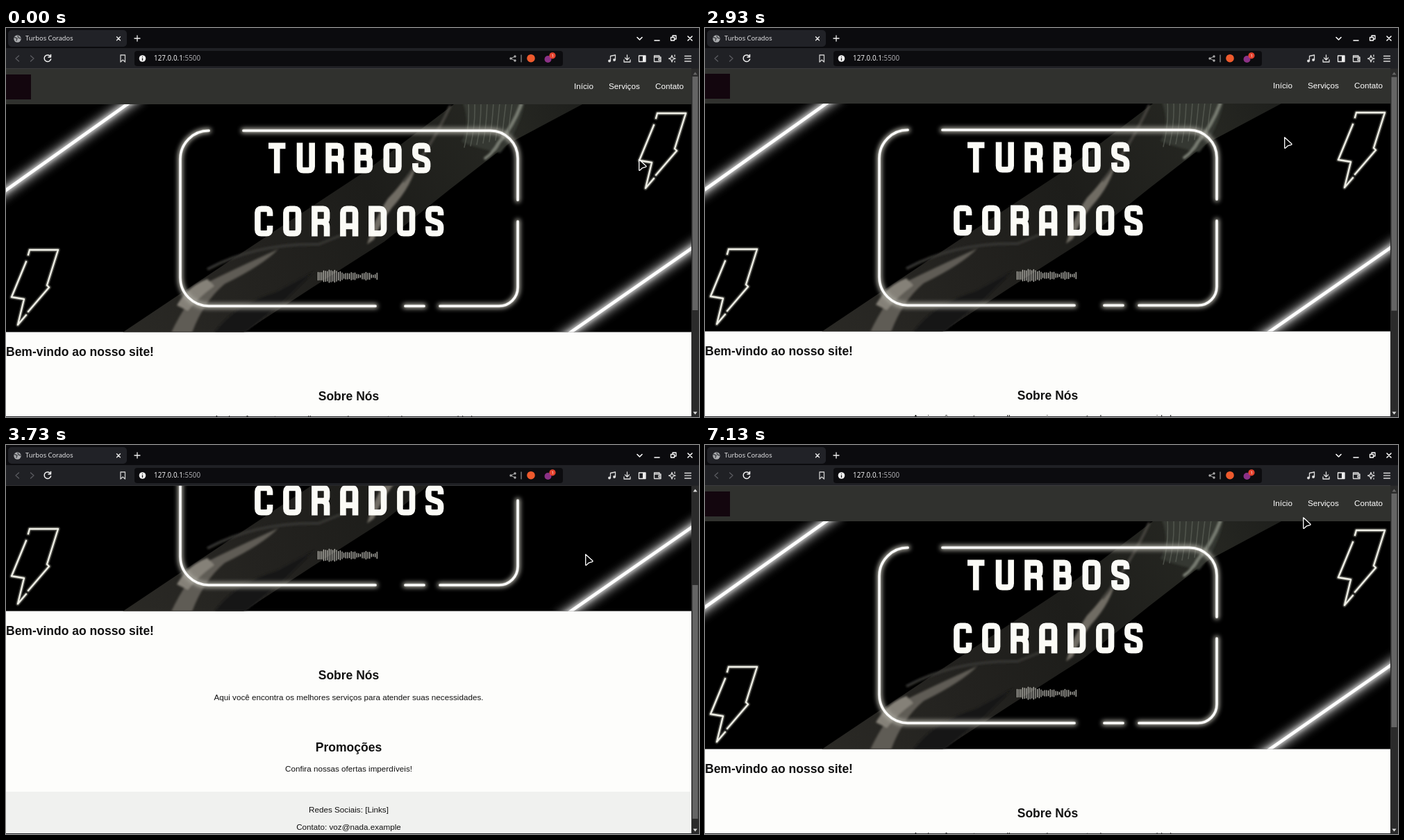
Recreate the animation shown at these times as an HTML page. Size 998 by 561 pixels, loop 7790 ms.

```html
<!DOCTYPE html>
<html lang="pt-BR">
<head>
<meta charset="utf-8">
<title>Turbos Corados</title>
<style>
html, body { margin: 0; width: 100%; height: 100%; overflow: hidden; background: #0b0b0e; }
svg { display: block; width: 100vw; height: 100vh; }
.ui { font-family: "Noto Sans", "Open Sans", sans-serif; }
.page { font: 11.68px "Liberation Sans", Arial, sans-serif; fill: #111; }
.page .title { font-size: 17.5px; font-weight: bold; }
.line { fill: none; stroke-linecap: round; stroke-linejoin: round; }
</style>
</head>
<body>
<svg viewBox="0 0 998 561" xmlns="http://www.w3.org/2000/svg">
  <defs>
    <clipPath id="view"><rect y="58.5" width="987" height="501.5"/></clipPath>
    <clipPath id="bannerClip"><rect y="110" width="987" height="328.6"/></clipPath>
    <filter id="glow" filterUnits="userSpaceOnUse" x="-40" y="70" width="1070" height="410"><feGaussianBlur stdDeviation="3.2"/></filter>
    <filter id="wide" filterUnits="userSpaceOnUse" x="-60" y="60" width="1110" height="430"><feGaussianBlur stdDeviation="6.5"/></filter>
    <filter id="soft" filterUnits="userSpaceOnUse" x="100" y="70" width="800" height="420"><feGaussianBlur stdDeviation="1.6"/></filter>
    <linearGradient id="film" gradientUnits="userSpaceOnUse" x1="170" y1="439" x2="830" y2="110">
      <stop offset="0" stop-color="#2a2925"/><stop offset=".3" stop-color="#23221f"/>
      <stop offset=".55" stop-color="#1d1d1a"/><stop offset=".85" stop-color="#262722"/><stop offset="1" stop-color="#1e1f1c"/>
    </linearGradient>
    <path id="bolt" d="M37 1H75L59 52 62 55 32 90M29 95 17 109 26 72 8 69 29 18M32 8 34 1H40"/>
  </defs>

  <g clip-path="url(#view)"><g id="page" class="page">
    <rect y="58" width="987" height="720" fill="#fdfdfb"/>
    <rect y="58" width="987" height="52" fill="#30312e"/>
    <rect y="67" width="36" height="36" fill="#13060e"/>
    <g fill="#fff"><text x="818" y="88">Início</text><text x="868" y="88">Serviços</text><text x="935" y="88">Contato</text></g>
    <g id="banner" clip-path="url(#bannerClip)"></g>
    <text class="title" x="0" y="472.5">Bem-vindo ao nosso site!</text>
    <rect y="699" width="987" height="80" fill="#f0f1ef"/>
    <g text-anchor="middle">
      <text class="title" x="493.5" y="537">Sobre Nós</text>
      <text x="493.5" y="566.5">Aqui você encontra os melhores serviços para atender suas necessidades.</text>
      <text class="title" x="493.5" y="641">Promoções</text>
      <text x="493.5" y="670">Confira nossas ofertas imperdíveis!</text>
      <text x="493.5" y="728.5">Redes Sociais: [Links]</text>
      <text x="493.5" y="753.5">Contato: voz@nada.example</text>
    </g>
  </g></g>

  <rect x="987" y="58" width="11" height="503" fill="#2b2b2b"/>
  <rect id="thumb" x="988.5" y="70" width="8" height="337" fill="#656565"/>
  <path id="upArrow" d="M989.5 67.5 992.5 63.5 995.5 67.5Z" fill="#ddd"/>
  <path d="M989.5 553.5 992.5 557.5 995.5 553.5Z" fill="#ddd"/>
  <rect y="560" width="998" height="1" fill="#25262a"/>

  <g id="chrome" class="ui"></g>
  <g id="taskbar" class="ui"></g>
  <path id="cursor" class="line" d="M.7.8V15.6Q.8 17 2 16L5.5 12.8 10.4 11.4Q11.6 10.8 10.6 9.8Z" style="fill:#050505" stroke="#fff" stroke-width="1.3"/>
</svg>

<script>
const $ = id => document.getElementById(id);
const stroke = (d, color = '#ddd', width = 1.3, extra = '') =>
  `<path class="line" d="${d}" stroke="${color}" stroke-width="${width}" ${extra}/>`;
const disc = (x, y, r, fill) => `<circle cx="${x}" cy="${y}" r="${r}" fill="${fill}"/>`;
const box = (x, y, w, h, fill, r = 0) => `<rect x="${x}" y="${y}" width="${w}" height="${h}" rx="${r}" fill="${fill}"/>`;
const label = (x, y, size, text, fill = '#eee', weight = 400) =>
  `<text x="${x}" y="${y}" font-size="${size}" font-weight="${weight}" fill="${fill}">${text}</text>`;

// Display lettering on a 27 x 45 grid
const glyphs = {
  T: 'M1 4.5H26M13.5 4.5V45',
  U: 'M4.5 0V35Q4.5 40.5 10 40.5H17Q22.5 40.5 22.5 35V0',
  R: 'M4.5 45V4.5H17Q22.5 4.5 22.5 10V18Q22.5 23.5 17 23.5H5M15 23.5Q22.5 24 22.5 31V45',
  B: 'M4.5 22H16Q21.5 22 21.5 17V10Q21.5 4.5 16 4.5H4.5V40.5H17Q22.5 40.5 22.5 35V28Q22.5 22 16 22',
  O: 'M4.5 10Q4.5 4.5 10 4.5H17Q22.5 4.5 22.5 10V35Q22.5 40.5 17 40.5H10Q4.5 40.5 4.5 35Z',
  S: 'M22.5 14V10Q22.5 4.5 17 4.5H10Q4.5 4.5 4.5 10V15Q4.5 19 8 21L19 25Q22.5 27 22.5 31V35Q22.5 40.5 17 40.5H10Q4.5 40.5 4.5 35V30',
  C: 'M22.5 15V10Q22.5 4.5 17 4.5H10Q4.5 4.5 4.5 10V35Q4.5 40.5 10 40.5H17Q22.5 40.5 22.5 35V29',
  A: 'M4.5 45V10Q4.5 4.5 10 4.5H17Q22.5 4.5 22.5 10V45M4.5 30H22.5',
  D: 'M4.5 4.5H16Q22.5 4.5 22.5 11V34Q22.5 40.5 16 40.5H4.5Z'
};
const lettering = (word, x, y, pitch) => `<g aria-label="${word}">` + [...word].map((c, i) =>
  `<path transform="translate(${x + i * pitch} ${y}) scale(.98)" d="${glyphs[c]}" fill="none" stroke="#fbfbf6" stroke-width="8.8"/>`).join('') + '</g>';

function drawBanner() {
  const frame = 'M292 148A41 41 0 0 0 251 189V360A41 41 0 0 0 292 401H532M575 401H602M625 401H710A27 27 0 0 0 737 374V279M737 248V188A40 40 0 0 0 697 148H342';
  const beams = 'M-10 241 190 99M800 448 1000 309';
  const bolts = [[0, 319], [904, 122]].map(([x, y]) => {
    const use = (color, width, opacity) =>
      `<use href="#bolt" class="line" stroke="${color}" stroke-width="${width}" opacity="${opacity}"/>`;
    return `<g transform="translate(${x} ${y})">${use('#8a8a80', 7, .22)}${use('#a5a59b', 4.4, .45)}${use('#efefe6', 2.3, 1)}</g>`;
  }).join('');

  let wave = '';
  for (let i = 0; i < 33; i++) {
    const h = i < 17 ? 4 + 5 * Math.abs(Math.sin(i * .19 + .3)) - (i % 3) * .9
                     : 1.5 + 4 * Math.abs(Math.sin(i * .42)) - (i % 2);
    const x = 449.5 + i * 2.65;
    wave += `M${x} ${358 - h}V${358 + h}`;
  }

  let folds = '';
  for (let i = 0; i < 8; i++)
    folds += `M${666 + i * 9} 108Q${668 + i * 8} 140 ${660 + i * 9} ${172 - i * 2}`;

  $('banner').innerHTML =
    box(0, 110, 987, 329, '#000') +
    '<path d="M168 439 250 384 400 284 520 205 645 110H830L725 166 640 232 545 308 440 375 342 439Z" fill="url(#film)"/>' +
    '<g filter="url(#soft)">' +
    '<path d="M238 439Q262 388 292 366 330 347 392 319 370 342 315 369 285 394 268 439Z" fill="#5f5c54"/>' +
    '<path d="M246 400Q262 372 290 362L300 372Q275 390 262 408Z" fill="#858178"/>' +
    '<path d="M300 439Q330 398 390 380L445 350 400 394 345 439Z" fill="#161614"/>' +
    '<path d="M520 312Q530 275 550 246 570 226 592 192 586 226 556 259 538 283 530 305Z" fill="#706c63"/>' +
    '<path d="M290 348Q360 310 450 312L490 296" fill="none" stroke="#363430" stroke-width="4"/>' +
    '<path d="M572 222Q608 180 640 112" fill="none" stroke="#45433e" stroke-width="4"/>' +
    '<path d="M658 108H747Q738 150 712 180 680 174 656 164 670 140 658 108Z" fill="#363932"/>' +
    stroke('M742 110Q730 142 710 165 702 180 690 188', '#7c8076', 4) + '</g>' +
    stroke(folds, '#62665c', 1.5, 'opacity=".65"') +
    stroke(beams, '#858585', 17, 'filter="url(#wide)"') +
    stroke(beams, '#ddd', 6, 'filter="url(#glow)"') +
    stroke(beams, '#fff', 4.6) +
    stroke(frame, '#aaa9a0', 7.5, 'filter="url(#glow)"') +
    stroke(frame, '#e4e4da', 4.4, 'opacity=".5"') +
    stroke(frame, '#fff', 3.2) +
    bolts +
    lettering('TURBOS', 377, 165.5, 41.6) +
    lettering('CORADOS', 358, 256.5, 41) +
    stroke(wave, '#bdbcb5', 1.3);
}

function drawChrome() {
  const dim = '#5b5c61';
  $('chrome').innerHTML =
    box(0, 0, 998, 30, '#0b0b0e') + box(0, 29, 998, 29.5, '#202125') +
    box(3, 3, 171, 24, '#212227', 5) +
    disc(16.5, 15.5, 5.2, '#a9abae') + stroke('M12.5 13.5 16 15 15 18M17 11.5 18 14 21 15', '#44464a', 1.4) +
    label(28, 18.3, 9.3, 'Turbos Corados', '#e2e2e4') +
    stroke('M159.5 12.8 164.5 17.8M164.5 12.8 159.5 17.8M189 11V19M185 15H193', '#eee') +
    stroke('M909 13.5 912.5 17 916 13.5M934 18H941M982 12 988 18M988 12 982 18', '#fff', 1.6) +
    stroke('M957.5 13.5H962.5V18H957.5ZM960 13V11H965V16H963', '#fff') +
    stroke('M18.5 40 14 44 18.5 48M35.5 40 40 44 35.5 48', dim) +
    stroke('M63.8 40.8A4.8 4.8 0 1 0 64.6 45M64.5 38.5V42H61', '#f4f4f4', 1.5) +
    box(185, 33, 617, 22, '#0c0c0f', 4) +
    stroke('M165 39H171.5V49L168.2 46 165 49Z', '#ccc') +
    disc(196.5, 44, 4.8, '#eee') + stroke('M196.5 43.8V46.3M196.5 41.5V41.6', '#111', 1.2) +
    `<text x="213" y="47.3" font-size="9.9" fill="#ececee">127.0.0.1<tspan fill="#a9a9ad">:5500</tspan></text>` +
    stroke('M733 41 727 44 733 47', '#aaa', 1) + disc(733, 41, 1.7, '#aaa') + disc(727, 44, 1.7, '#aaa') + disc(733, 47, 1.7, '#aaa') +
    stroke('M742 39V49', '#aaa', 1) +
    disc(756, 43.7, 5.8, '#ee5a2d') + disc(780.5, 45, 5, '#8b3186') +
    disc(787, 39.8, 4.6, '#e5432f') + label(785.5, 42.2, 6, '1', '#fff') +
    stroke('M870.5 47.5V40.5L877.5 39V46', '#ddd') + disc(869, 47.5, 1.9, '#ddd') + disc(876, 46, 1.9, '#ddd') +
    stroke('M894.5 39V46M891.5 43 894.5 46 897.5 43M890 46V49H899V46') +
    stroke('M911.5 40H921V48.5H911.5Z', '#eee') + box(917, 40, 4, 9, '#eee') +
    stroke('M933.5 40H941V42H943V48.5H933.5ZM933.5 42H941M943 44H940V46.5H943') +
    stroke('M959 39.5 960.3 43 964 44.2 960.3 45.5 959 49 957.7 45.5 954.5 44.2 957.7 43ZM963 39V41M963 48V49') +
    stroke('M977.5 40.5H986.5M977.5 44.2H986.5M977.5 48H986.5');
}

function drawTaskbar() {
  const purple = '#8462c6', light = '#eee';
  $('taskbar').innerHTML =
    box(0, 531, 998, 30, '#25262c') + box(37, 531, 1, 30, '#34353b') +
    disc(15, 546, 11, '#e6e6e6') +
    box(397, 531, 27, 30, '#46474d') + disc(411.5, 546, 9.5, '#ef5b31') +
    disc(403.5, 539, 6, '#3d3e43') + label(401, 542, 8.5, '2', '#fff') +
    box(430, 536, 20, 20, '#35a0a6', 3) + box(459, 536, 20, 20, '#2368bd', 3) +
    box(488, 538, 10, 8, '#6748a8', 2) + box(488, 540, 21, 15, '#8060bd', 2) +
    box(516, 535, 21, 21, '#141519', 3) + label(519, 543, 7, '$_', '#eee') +
    box(547, 536, 20, 20, '#62b3d0', 3) + stroke('M550 547H553L555 540 558 552 561 544 563 547', '#fff') +
    disc(586, 546, 10, '#4b4945') +
    [397, 455, 485, 514].map(x => box(x, 559, 27, 2, purple)).join('') +
    disc(689.5, 544.5, 3.8, '#df4e7c') + stroke('M689.5 548V552', '#df4e7c') +
    label(699, 550, 9.6, '2160k - 100% - 1.00', light, 700) +
    stroke('M799.5 543.5 804.5 549 802 551.5V541.5L804.5 544 799.5 549.5', '#6a6b70') +
    stroke('M814.5 542H823.5V551.5H814.5ZM819 545V549M817 541H821', light) +
    box(828, 531, 17, 30, purple) +
    stroke('M832 542.5 836.5 541 841 542.5V547Q840 550 836.5 552 833 550 832 547Z', '#fff', 1.5) + disc(836.5, 546, 2, '#fff') +
    disc(857, 546.5, 5.5, '#fff') + disc(857, 546.5, 4.5, '#e51e23') +
    `<path d="M874 548 880 542 885 542 884 548 880 551 879 547Z" fill="${light}"/>` +
    label(889, 550, 9.5, '1', light, 700) +
    stroke('M902.5 544.5Q907.5 540 912.5 544.5M904.5 547Q907.5 544.5 910.5 547', light, 1.6) + disc(907.5, 550, 1.6, light) +
    stroke('M924 550V543L930 542V548.5', light, 1.6) + disc(923, 550, 2, light) + disc(929, 549, 2, light) +
    stroke('M941.5 542.5H948.5V551.5H941.5ZM944 541H946M947 546 945 549H950L947 552', light, 1.4) +
    label(957, 550, 9.6, '21:34', light, 700) +
    box(990, 535, 4.5, 22, '#55565b');
}

// Times below are counted in ticks of 1/15 s
const LOOP = 7790;
const updates = [[9, 21], [24, 26], [30, 30], [33, 35], [44, 56], [61, 61], [67, 69],
  [74, 74], [76, 77], [79, 80], [82, 82], [97, 97], [107, 107]];
const scrollKeys = [[43, 0], [44, 1], [47, 39], [51, 101], [56, 199], [61, 214], [66, 214], [67, 150], [68, 75], [69, 15], [74, 0]];
const barKeys = [[13, 30], [16, 0], [23, 0], [26, 30]];
const cursorX = [[8, 911], [14, 840], [15, 838], [17, 828], [21, 826], [35, 834], [75, 834], [82, 861]];
const cursorY = [[8, 189], [14, 556], [15, 556], [17, 523], [20, 300], [21, 235], [26, 175], [35, 157], [75, 157], [82, 104]];

function at(keys, t) {
  if (t <= keys[0][0]) return keys[0][1];
  for (let i = 1; i < keys.length; i++) {
    const [t0, v0] = keys[i - 1], [t1, v1] = keys[i];
    if (t <= t1) return v0 + (v1 - v0) * (t - t0) / (t1 - t0);
  }
  return keys[keys.length - 1][1];
}

function shownTick(ms) {
  const tick = Math.floor((ms + 4) * .015);
  let shown = 0;
  for (const [first, last] of updates) if (tick >= first) shown = Math.min(tick, last);
  return shown;
}

function render(ms) {
  const t = shownTick(ms);
  const scroll = Math.round(at(scrollKeys, t));
  $('page').setAttribute('transform', `translate(0 ${-scroll})`);
  $('thumb').setAttribute('y', 70 + scroll * .663);
  $('upArrow').setAttribute('fill', scroll > 1 ? '#ddd' : '#666');
  $('taskbar').setAttribute('transform', `translate(0 ${at(barKeys, t)})`);
  $('cursor').setAttribute('transform', `translate(${at(cursorX, t)} ${at(cursorY, t)})`);
}

drawBanner();
drawChrome();
drawTaskbar();
const start = performance.now();
function loop() {
  render((performance.now() - start) % LOOP);
  requestAnimationFrame(loop);
}
render(0);
requestAnimationFrame(loop);
</script>
</body>
</html>
```
